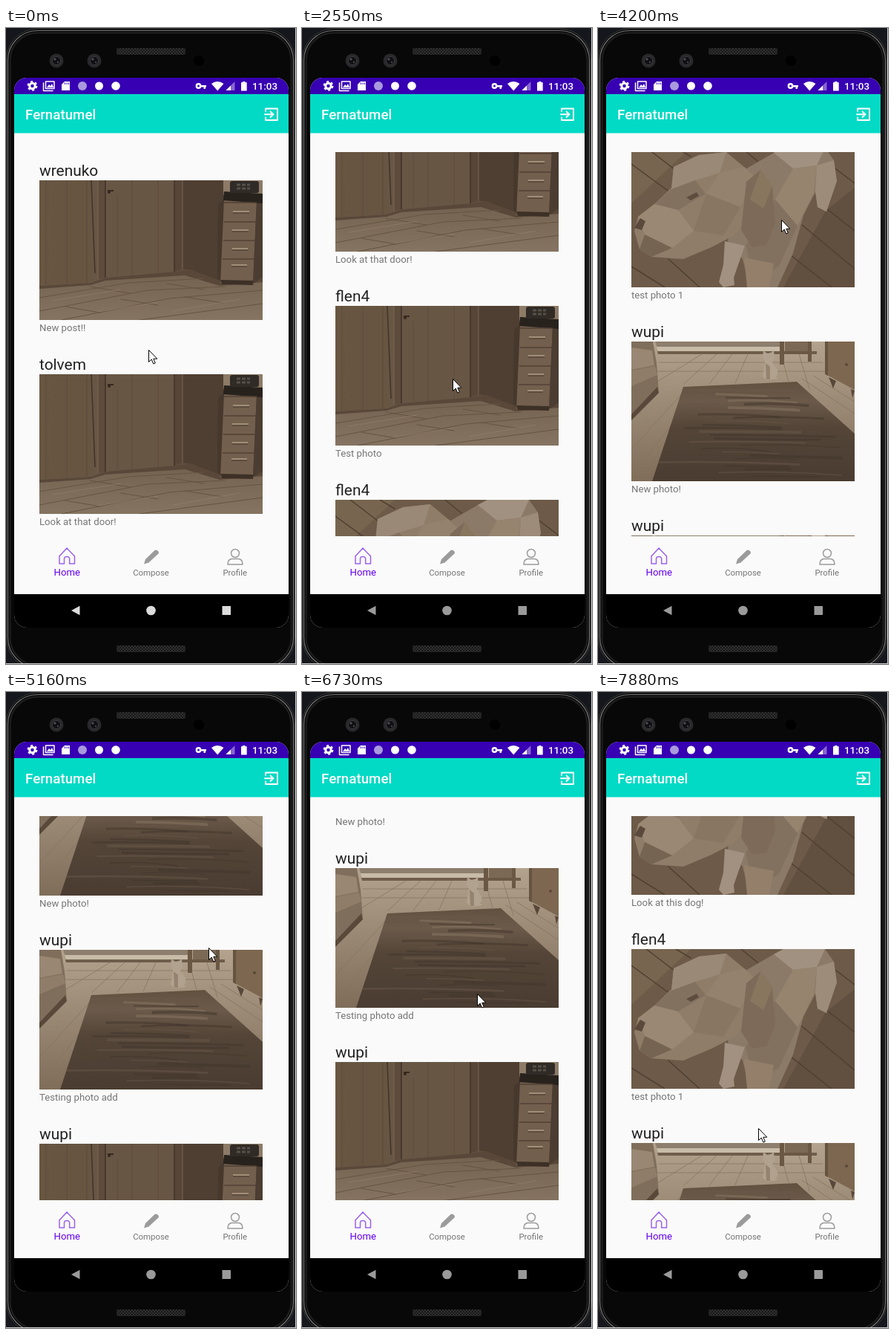
Recreate the animation shown at these times as an HTML page. Size 391 by 856 pixels, loop 8000 ms.

```html
<!DOCTYPE html>
<html lang="en">
<head>
<meta charset="utf-8">
<title>Photo feed</title>
<style>
html, body { margin: 0; width: 100%; height: 100%; overflow: hidden; background: #0b0b0c; }
svg { display: block; }
text { font-family: Roboto, "Noto Sans", sans-serif; }
.user { font-size: 20.9px; fill: #212121; }
.caption { font-size: 13.2px; fill: #757575; }
.label { font-size: 11.4px; fill: #757575; text-anchor: middle; }
.line { fill: none; stroke-linecap: round; stroke-linejoin: round; }
</style>
</head>
<body>
<svg id="stage" width="391" height="856" viewBox="0 0 391 856">
<defs>
  <clipPath id="feedClip"><rect x="44" y="167" width="303" height="517"/></clipPath>
  <clipPath id="photoClip"><rect width="301" height="188"/></clipPath>
  <clipPath id="screenClip"><rect x="11" y="67" width="370" height="740" rx="17"/></clipPath>
  <pattern id="mesh" width="4" height="4" patternUnits="userSpaceOnUse">
    <rect width="4" height="4" fill="#303030"/><path d="M0 0L4 4M4 0L0 4" stroke="#191919"/>
  </pattern>
  <linearGradient id="wall"><stop stop-color="#6a5847"/><stop offset=".55" stop-color="#655342"/><stop offset="1" stop-color="#4f4033"/></linearGradient>
  <linearGradient id="boards" x2="0" y2="1"><stop stop-color="#73614f"/><stop offset="1" stop-color="#857462"/></linearGradient>
  <linearGradient id="room" x2="0" y2="1"><stop stop-color="#b3a38e"/><stop offset=".35" stop-color="#a08f7a"/><stop offset="1" stop-color="#7f6d59"/></linearGradient>
  <linearGradient id="rug" x2="0" y2="1"><stop stop-color="#62513f"/><stop offset=".2" stop-color="#6b5a4a"/><stop offset=".45" stop-color="#544538"/><stop offset="1" stop-color="#4a3c31"/></linearGradient>

  <g id="door" clip-path="url(#photoClip)">
    <rect width="301" height="188" fill="url(#wall)"/>
    <path d="M0 0H69V138L0 144Z" fill="#66543f" opacity=".5"/>
    <path d="M79 0H89V131L79 133Z" fill="#5d4b3b"/>
    <path d="M89 0H182V123L89 131Z" fill="#685645"/>
    <path d="M182 0H193V119L182 123Z" fill="#574638"/>
    <path d="M193 0H249V137L205 121L193 119Z" fill="#4e3f32"/>
    <path d="M9 0V142M37 0V140M64 0V138M105 20V128M125 0V128M160 0V125" stroke="#5e4d3e" stroke-width="1.2"/>
    <path d="M70 0L75 125M89 0V131M182 0V123" stroke="#433428" stroke-width="1.6"/>
    <path d="M79 0V133M193 0V119" stroke="#7a6753"/>
    <path d="M92 14H100" stroke="#37291f" stroke-width="2"/><circle cx="94" cy="16" r="2" fill="#33271e"/>
    <path d="M0 142L69 138L89 131L182 123L205 121L243 138L301 128V188H0Z" fill="url(#boards)"/>
    <path d="M0 142L69 138L89 131L182 123L205 120L243 137L301 130V137L243 142L196 128L89 135L69 141L0 146Z" fill="#594839"/>
    <path d="M0 158L120 138L222 132M0 176L145 148L250 143M30 188L175 159L301 148M135 188L301 166M68 143L122 152M110 160L160 168M172 139L222 147M196 157L247 165M35 170L82 178" class="line" stroke="#665442"/>
    <path d="M18 162L110 147M78 177L160 164M180 176L270 160" stroke="#95836f" opacity=".6"/>
    <path d="M248 0H301V20H248Z" fill="#8d7b68"/>
    <path d="M241 32L249 26L246 137L240 132Z" fill="#46382c"/>
    <path d="M249 27H293L288 139H244Z" fill="#735f4d"/>
    <path d="M293 27H301V130L288 139Z" fill="#4b3d31"/>
    <path d="M249 15L301 18V31L248 27Z" fill="#28221d"/>
    <rect x="257" y="1" width="39" height="16" rx="3" fill="#302b26"/><path d="M266 6H284M266 11H284" stroke="#565049" stroke-width="3" stroke-dasharray="5 2"/>
    <path d="M249 30H293M249 56H292M248 81H291M247 106H290" stroke="#524235" stroke-width="1.7"/>
    <path d="M261 42H283M260 67H282M260 92H281M259 114H280" stroke="#a18e78" stroke-width="1.8"/>
    <path d="M261 44H283M260 69H282M260 94H281M259 116H280" stroke="#493b2f"/>
    <path d="M244 134L288 135V141L246 140Z" fill="#3d3026"/>
  </g>

  <g id="dog" clip-path="url(#photoClip)">
    <rect width="301" height="188" fill="#6d5a48"/>
    <path d="M0 0H80L0 75Z" fill="#78654f"/>
    <path d="M262 85L301 54V188H205Z" fill="#614f3f"/>
    <path d="M0 22L52 60M20 0L62 32M60 0L80 12M0 160L45 188M50 150L92 188M215 145L270 188M230 104L301 163M258 78L301 112M275 28L301 48M148 0L170 18" class="line" stroke="#4f4032" stroke-width="1.5"/>
    <path d="M152 30L192 7L205 0H261L273 17L277 45L263 86L251 80L248 60L232 91L218 142L197 188H160L150 150L130 126Z" fill="#8c7a68"/>
    <path d="M192 7L218 28L250 24L261 0H205Z" fill="#a19180"/>
    <path d="M250 24L273 17L277 45L263 86L251 80L248 58Z" fill="#9d8c7a"/>
    <path d="M218 28L250 24L246 61L224 105L194 70Z" fill="#96846f"/>
    <path d="M194 70L224 105L199 160L166 178L154 132Z" fill="#837160"/>
    <path d="M126 126L153 132L138 175L139 185L124 188L118 181L124 158Z" fill="#a29180"/>
    <path d="M152 148L192 156L186 188H156Z" fill="#947f6b"/>
    <path d="M4 112L9 93L31 76L54 54L57 26L91 10L128 6L152 26L166 39L161 92L139 118L108 134L70 150L27 147L11 137Z" fill="#8f7d6a"/>
    <path d="M57 26L91 10L128 6L119 34L86 44L54 56Z" fill="#9a8976"/>
    <path d="M54 56L86 44L100 62L63 84L31 76Z" fill="#837160"/>
    <path d="M9 93L31 76L63 84L84 112L55 135L18 117Z" fill="#9a8875"/>
    <path d="M119 34L152 26L166 39L147 80L101 62Z" fill="#94826e"/>
    <path d="M101 62L147 80L124 118L84 112Z" fill="#887663"/>
    <path d="M18 117L55 135L27 147L11 137Z" fill="#766452"/>
    <path d="M155 46L174 30L190 52L194 102L182 131L163 134L148 111Z" fill="#7d6a58"/>
    <path d="M174 30L190 52L178 82L160 70Z" fill="#89765f"/>
    <path d="M4 108L12 95L19 99L14 111Z" fill="#5b4a3b"/><path d="M74 67L88 60L91 65L80 71Z" fill="#5e4d3e"/>
  </g>

  <g id="cat" clip-path="url(#photoClip)">
    <rect width="301" height="188" fill="url(#room)"/>
    <path d="M32 0H202V9H35Z" fill="#8d7e6d"/><path d="M34 7H202V13H36Z" fill="#c8bba8"/>
    <path d="M35 13H250V17H36Z" fill="#6e5d4b"/>
    <path d="M37 28H258M34 40H264M35 54L95 17M71 57L115 17M105 57L136 17M140 56L157 17M212 54L202 17M240 64L226 17M0 145L73 65M0 182L68 94M14 188L60 124M230 50L301 97M245 46L301 81" class="line" stroke="#85735e" opacity=".75"/>
    <path d="M200 0H206V31H200ZM238 0H243V27H238ZM206 13H238V17H206Z" fill="#6b5844"/>
    <path d="M207 0H238V13H207Z" fill="#7c6955"/>
    <path d="M0 0H29L34 29L37 69L0 106Z" fill="#806e5c"/>
    <path d="M0 8L28 12L31 32L0 38Z" fill="#998773"/><path d="M0 39L32 33L35 45L0 60Z" fill="#8f7d69"/><path d="M37 69L0 106V98L35 61Z" fill="#59493a"/>
    <path d="M261 0H301V65L262 44Z" fill="#7d6750"/><path d="M261 0H265V46L261 44Z" fill="#665340"/><path d="M266 48L272 63L276 53ZM296 64L298 76L301 66Z" fill="#59483a"/>
    <circle cx="290" cy="31" r="2" fill="#594838"/>
    <path id="rugShape" d="M70 61L223 54L301 124V188H28Z" fill="url(#rug)"/>
    <g id="streaks"></g>
    <path d="M178 12L183 16L188 15L192 12L193 23L190 28L197 38V50L183 52L177 47L180 28L177 21Z" fill="#b1a28f"/>
    <path d="M181 29L187 34V51L182 51Z" fill="#94836f"/><path d="M196 47Q204 49 206 44" class="line" stroke="#a59681" stroke-width="2.5"/>
  </g>
</defs>

<!-- phone body -->
<rect width="391" height="856" fill="#15171c"/>
<g fill="#080808">
  <rect x=".5" y="1" width="389" height="862" rx="42" stroke="#3c3c3c"/>
  <rect x="2.5" y="3.5" width="385" height="857" rx="40" stroke="#777" stroke-width="1.2"/>
  <rect x="5.5" y="6.5" width="379" height="851" rx="37" stroke="#202020" stroke-width="2"/>
</g>
<path d="M390.5 0V856M0 855.5H391" stroke="#c9c9c9"/>
<rect x="149" y="27" width="93" height="9" rx="2" fill="url(#mesh)"/>
<rect x="149" y="831" width="93" height="9" rx="2" fill="url(#mesh)"/>
<g id="lenses"></g>
<circle cx="260" cy="44" r="7" fill="#000"/>

<g clip-path="url(#screenClip)">
  <rect x="11" y="67" width="370" height="740" fill="#fafafa"/>
  <rect x="11" y="67" width="370" height="22" fill="#3700b3"/>
  <rect x="11" y="89" width="370" height="52.5" fill="#03dac5"/>
  <rect x="11" y="762" width="370" height="45" fill="#000"/>
</g>

<!-- status bar -->
<g fill="#fff">
  <circle cx="35.500" cy="78" r="3.700" fill="none" stroke="#fff" stroke-width="3"/>
  <circle cx="35.500" cy="78" r="5.800" fill="none" stroke="#fff" stroke-width="2.200" stroke-dasharray="3 3.070"/>
  <path d="M50.500 74V84.500H63" class="line" stroke="#fff" stroke-width="1.500"/>
  <rect x="53.500" y="72" width="11.500" height="9.500" class="line" stroke="#fff" stroke-width="1.500"/><path d="M55 80L58 76L60 78L62 75L64 80Z"/>
  <path d="M79 72H86V84H75V76Z"/><path d="M79.500 73.500V76M82 73.500V76M84.300 73.500V76" stroke="#3700b3"/>
  <circle cx="103" cy="78" r="6" fill="#a99add"/>
  <circle cx="125.500" cy="78" r="5.500"/><circle cx="148" cy="78" r="5.800"/>
  <circle cx="259.500" cy="78" r="2.700" fill="none" stroke="#fff" stroke-width="2.400"/><path d="M262 77H270V79.500H269V82H266.500V79.500H262Z"/>
  <path d="M277 75Q285 69 293.500 75L285.200 84.500Z"/>
  <path d="M308.500 72V84H296.500Z" opacity=".4"/><path d="M303 77.500V84H296.500Z"/>
  <path d="M319 72H322.500V73.300H324.700V84.500H317V73.300H319Z"/>
  <text x="332" y="83" font-size="13.400" font-weight="500">11:03</text>
  <text x="26" y="123" font-size="18.800" font-weight="500">Fernatumel</text>
</g>
<path d="M350 112V108.500H366V124H350V120.500M349 116.300H360M356.500 112.500L360.500 116.300L356.500 120" class="line" stroke="#fff" stroke-width="1.900"/>

<g clip-path="url(#feedClip)"><g id="feed"></g></g>

<!-- bottom tabs -->
<path d="M72 711L82 700L92.500 711M72 710.500V721H78.500V714.500Q78.500 711.500 82 711.500T85.700 714.500V721H92.500V710.500" class="line" stroke="#9b61ee" stroke-width="1.500"/>
<path d="M186 721.500L188 715L200.500 703Q203 701.500 205 704T205 708L192.500 719.500Z" fill="#9b9b9b"/>
<g class="line" stroke="#9b9b9b" stroke-width="1.500"><circle cx="309" cy="707" r="5.500"/><path d="M299 722Q299 714.500 305 714.500H313Q319 714.500 319 722Z"/></g>
<text class="label" x="82.300" y="736.700" style="font-size:13.200px;fill:#6200ee">Home</text>
<text class="label" x="195.500" y="736.700">Compose</text>
<text class="label" x="308.700" y="736.700">Profile</text>
<g id="buttons"><path d="M88 784L99.500 777.800V790.200Z"/><circle cx="195.500" cy="784" r="6.300"/><rect x="291.500" y="778" width="11.500" height="12"/></g>

<path id="cursor" d="M.5 .5V16.500L4.200 13L6.800 19L9.300 18L6.800 12.200H11.800Z" fill="#fff" stroke="#000" stroke-linejoin="round"/>
</svg>
<script>
const $ = id => document.getElementById(id);
const PITCH = 261, LOOP = 8000;

const posts = [
  ['wrenuko', 'door', 'New post!!'],
  ['tolvem', 'door', 'Look at that door!'],
  ['flen4', 'door', 'Test photo'],
  ['flen4', 'dog', 'Look at this dog!'],
  ['flen4', 'dog', 'test photo 1'],
  ['wupi', 'cat', 'New photo!'],
  ['wupi', 'cat', 'Testing photo add'],
  ['wupi', 'door', 'Door again']
];
$('feed').innerHTML = posts.map(([user, photo, caption], i) => `
  <g transform="translate(45 ${205 + i * PITCH})">
    <text class="user" y="-6.5">${user}</text>
    <use href="#${photo}"/>
    <text class="caption" y="202.500">${caption}</text>
  </g>`).join('');

$('lenses').innerHTML = [68, 119].map(x => `
  <circle cx="${x}" cy="44" r="9.500" fill="#29292b"/>
  <circle cx="${x}" cy="44" r="5.500" fill="#101013" stroke="#3b3b3f"/>
  <circle cx="${x - 2}" cy="42" r="1.500" fill="#55555c"/>
  <circle cx="${x + 2}" cy="46" r="1.200" fill="#44444a"/>`).join('');

// soft light and shade across the rug
let seed = 7;
const random = () => (seed = seed * 16807 % 2147483647) / 2147483647;
$('streaks').innerHTML = Array.from({ length: 26 }, (_, i) => {
  const y = 66 + i * 4.6;
  const left = 70 - (y - 61) * .33, right = Math.min(301, 223 + (y - 54) * 1.11);
  const x = left + random() * (right - left) * .5;
  const w = (right - x) * (.35 + random() * .6);
  const tone = y < 90 && i % 2 ? '#8a7864' : i % 3 ? '#41342a' : '#6a594a';
  return `<path d="M${x} ${y}q${w / 2} ${random() * 5 - 3} ${w} ${random() * 4}" fill="none" stroke="${tone}" stroke-width="${1 + random() * 3}" opacity=".5"/>`;
}).join('');

// bursts of screen updates: start, end, count
const bursts = [[140, 390, 3], [680, 1220, 5], [1500, 2430, 8], [2550, 3480, 8], [3630, 4620, 8],
  [4740, 5700, 8], [5820, 5820, 1], [6110, 7030, 8], [7180, 7880, 6]];
const ticks = [0, ...bursts.flatMap(([a, b, n]) =>
  Array.from({ length: n }, (_, i) => n > 1 ? a + (b - a) * i / (n - 1) : a))];

const scrollKeys = [[0, 0], [1640, 0], [2100, 254], [2300, 322], [2550, 353], [2815, 360], [3215, 690],
  [3480, 755], [3630, 760], [4190, 1088], [4200, 1088], [4620, 1150], [4740, 1168], [5150, 1424], [5160, 1424],
  [5430, 1545], [5560, 1571], [6500, 1571], [6630, 1534], [6730, 1534], [7030, 1320], [7180, 1230], [7500, 1050], [7880, 903]];
const cursorKeys = [[0, 192, 433], [670, 192, 433], [950, 204, 325], [1220, 203, 560], [1500, 201, 634], [1640, 201, 634],
  [2100, 203, 380], [2550, 203, 472], [2815, 215, 630], [3215, 235, 300], [3630, 240, 600],
  [4190, 247, 258], [4200, 247, 258], [4740, 264, 600], [5150, 273, 344], [5160, 273, 344], [5560, 268, 330],
  [6110, 250, 365], [6500, 238, 370], [6630, 236, 406], [6730, 236, 406], [7030, 225, 620], [7300, 220, 630], [7880, 216, 587]];
const greyKeys = [[0, 220], [390, 180], [680, 172], [1220, 154]];

function sample(keys, t) {
  const i = keys.findIndex(k => k[0] > t);
  if (i < 0) return keys[keys.length - 1].slice(1);
  const a = keys[i - 1], b = keys[i], p = (t - a[0]) / (b[0] - a[0]);
  return a.slice(1).map((v, n) => v + (b[n + 1] - v) * p);
}

function draw() {
  const now = performance.now() % LOOP;
  const t = ticks.filter(tick => tick <= now).pop();
  const [scroll] = sample(scrollKeys, t);
  const [x, y] = sample(cursorKeys, t).map(Math.round);
  const grey = Math.round(sample(greyKeys, t)[0]);
  $('feed').setAttribute('transform', `translate(0 ${-Math.round(scroll)})`);
  $('cursor').setAttribute('transform', `translate(${x} ${y})`);
  $('buttons').setAttribute('fill', `rgb(${grey},${grey},${grey})`);
  requestAnimationFrame(draw);
}
draw();
</script>
</body>
</html>
```
